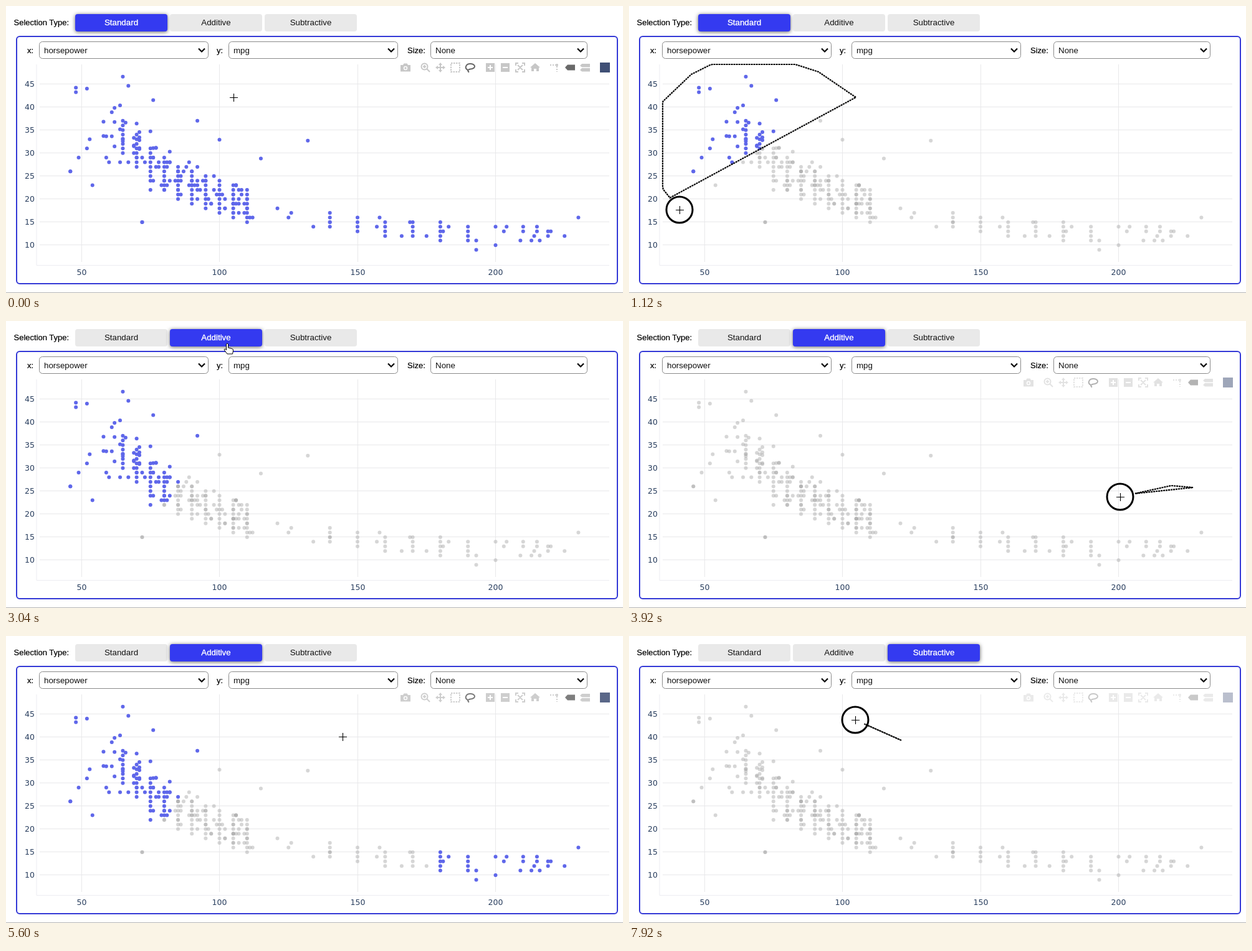
An HTML page that plays this animation: 990x462 px, repeating every 8 s.

```html
<!DOCTYPE html>
<html lang="en">
<head>
<meta charset="utf-8">
<title>Lasso selection</title>
<style>
  html, body { margin: 0; width: 100%; height: 100%; overflow: hidden; background: #fff; }
  svg { display: block; width: 990px; height: 462px; }
  text { font: 13.33px "Liberation Sans", Arial, sans-serif; fill: #111; }
  .label { font-size: 13px; fill: #000; stroke: #000; stroke-width: .2px; }
  .tick { font: 12.5px "DejaVu Sans", Verdana, sans-serif; fill: #2a3f5f; }
  .mid { text-anchor: middle; }
  .end { text-anchor: end; }
  .tab rect { fill: #e9e9e9; }
  .tab.on rect { fill: #343af0; filter: drop-shadow(0 1px 3px #0009); }
  .tab.on text { fill: #fff; stroke: #fff; stroke-width: .35px; }
  .dot { fill: #a6a6a6; fill-opacity: .46; }
  .dot.on { fill: #5f67ea; fill-opacity: 1; }
  #bar { fill: #c7c7c7; }
  #bar .line { fill: none; stroke: #c7c7c7; stroke-width: 2; }
</style>
</head>
<body>
<svg viewBox="0 0 990 462">
  <text class="label" x="12.5" y="31">Selection Type:</text>
  <g id="tabs"></g>
  <rect x="17" y="49" width="964" height="398" rx="5" fill="#fff" stroke="#3338d6" stroke-width="2"/>
  <path d="M0 461.5H990" stroke="#b4b4b4"/>
  <g id="selects"></g>
  <path d="M49 94V417.5H968" fill="none" stroke="#ececf1"/>
  <g id="grid" stroke="#e8e8ea"></g>
  <g id="ticks"></g>
  <g id="dots"></g>
  <g id="bar">
    <path d="M633 95h4l1.5-2.5h5l1.5 2.5h4v10.5h-16z"/>
    <circle cx="641" cy="100" r="3.2" fill="#fff"/><circle cx="641" cy="100" r="1.8"/>
    <circle class="line" cx="671.5" cy="97.5" r="5"/>
    <path class="line" d="M675 101l5 5M669 97.5h5M671.5 95v5M691 99h12M697 93v12"/>
    <path d="M697 91l3 4h-6zM697 107l3-4h-6zM689 99l4-3v6zM705 99l-4-3v6z"/>
    <rect class="line" x="714" y="92" width="14" height="14" stroke-dasharray="2.5 1.5"/>
    <path class="line" d="M741 103c-6-3-3-10 4-10s10 6 3 8c-4 1-7 1-7 3s2 0 1 3" style="stroke:#666"/>
    <path d="M770 92h14v14h-14zM794 92h14v14h-14z"/>
    <path class="line" d="M773 99h8M777 95v8M797 99h8" style="stroke:#fff"/>
    <path class="line" d="M818 96v-4h4M828 92h4v4M832 102v4h-4M822 106h-4v-4M821 95l8 8M829 95l-8 8"/>
    <path d="M849 92l8 7h-2v6h-4v-4h-4v4h-4v-6h-2z"/>
    <path class="line" d="M873 95h9M884 97v9" stroke-dasharray="2 2"/><circle cx="884" cy="95" r="2"/>
    <path d="M897 99l4-4.5h12v9h-12z" fill="#696969"/>
    <path d="M921 96l3-3h13v5.5h-13zM921 103l3-3h13v5.5h-13z"/>
    <rect x="953" y="91" width="16" height="16" fill="#3f4f75"/>
  </g>
  <path id="lasso" fill="none" stroke="#000" stroke-width="2.2" stroke-dasharray="3 1"/>
  <g id="pointer">
    <circle id="ring" r="21" fill="none" stroke="#000" stroke-width="3"/>
    <path id="cross" d="M-6 .5H7M.5-6V7" stroke="#000" stroke-width="1.1"/>
    <path id="hand" d="M-1.5 0q1.5-2 3 0v6l6 1.5q2.5.5 2 3.5l-1 5H0l-4.5-6q-1-2 1-2l2 1.5z" fill="#fff" stroke="#000"/>
    <path id="arrow" d="M0 0v13l3-3 2 5 2-1-2-5h4z" fill="#000" stroke="#fff"/>
  </g>
</svg>
<script>
const $ = id => document.getElementById(id);
const add = (parent, tag, attrs, text = "") => {
  const el = document.createElementNS("http://www.w3.org/2000/svg", tag);
  for (const k in attrs) el.setAttribute(k, attrs[k]);
  el.textContent = text;
  return parent.appendChild(el);
};
const px = hp => 121 + (hp - 50) * 4.43;
const py = mpg => 125.5 + (45 - mpg) * 7.414;
const clamp = (v, low, high) => Math.min(high, Math.max(low, v));

// Controls and axes
const tabs = ["Standard", "Additive", "Subtractive"].map((name, i) => {
  const g = add($("tabs"), "g", { class: "tab" }), x = 111 + i * 152;
  add(g, "rect", { x, y: 13, width: 148, height: 28, rx: 4 });
  add(g, "text", { x: x + 74, y: 31, class: "mid" }, name);
  return g;
});
function select(label, labelX, x, width, value) {
  const g = $("selects");
  add(g, "text", { x: labelX, y: 76, class: "label" }, label);
  add(g, "rect", { x: x + .5, y: 57.5, width: width - 1, height: 27, rx: 5, fill: "#fff", stroke: "#8a8a8a" });
  add(g, "text", { x: x + 8, y: 76 }, value);
  add(g, "path", { d: `M${x + width - 16} 68.5l5 5 5-5`, fill: "none", stroke: "#000", "stroke-width": 2.2 });
}
select("x:", 34, 53, 272, "horsepower");
select("y:", 338, 357, 272, "mpg");
select("Size:", 644, 681, 252, "None");
for (let hp = 50; hp <= 200; hp += 50) {
  const x = Math.floor(px(hp)) + .5;
  add($("grid"), "path", { d: `M${x} 94V412` });
  add($("ticks"), "text", { x, y: 433, class: "tick mid" }, hp);
}
for (let mpg = 10; mpg <= 45; mpg += 5) {
  const y = Math.floor(py(mpg)) + .5;
  add($("grid"), "path", { d: `M54 ${y}H968` });
  add($("ticks"), "text", { x: 46, y: y + 4.5, class: "tick end" }, mpg);
}

// Cars: mpg falls with the square of the power; round powers form columns
const dots = [];
const car = (hp, mpg) => {
  const x = px(hp), y = py(mpg);
  dots.push({ x, y, el: add($("dots"), "circle", { cx: x, cy: y, r: 3, class: "dot" }) });
};
const trend = hp => Math.min(35, 10.6 + 99000 / hp ** 2);
let seed = 7;
const random = () => (seed = seed * 16807 % 2147483647) / 2147483647;

function columns(from, to, step, below, above) {
  for (let hp = from; hp <= to; hp += step) {
    const mid = Math.round(trend(hp));
    for (let mpg = mid - below; mpg <= mid + above; mpg++) car(hp, mpg);
  }
}
function scatter(count, from, to) {
  while (count--) {
    const hp = Math.round(from + random() * (to - from));
    const mpg = trend(hp) + (random() + random() - 1) * 500 / hp;
    car(hp, mpg < 30 ? Math.round(mpg) : mpg);
  }
}
columns(65, 110, 5, 4, 3);
columns(140, 190, 10, 2, 1);
scatter(105, 58, 112);
scatter(26, 112, 225);
[[46, 26], [46, 26], [48, 43.2], [48, 44.2], [49, 29], [52, 44], [52, 31], [53, 33], [54, 23],
 [65, 46.6], [67, 44.6], [76, 41.5], [72, 15], [72, 15], [92, 37], [100, 32.9], [115, 28.8],
 [132, 32.7], [193, 9], [200, 10], [209, 11], [215, 14], [225, 12], [230, 16]]
  .forEach(p => car(...p));

// Pointer path: time, x, y
const moves = [
  [0, 365, 147], [60, 364, 147], [320, 304, 106], [460, 230, 82], [600, 160, 80], [760, 100, 110],
  [960, 30, 177], [1040, 46, 284], [1120, 81, 328], [1650, 140, 345], [1820, 262, 289],
  [1920, 318, 190], [2010, 318, 190], [2160, 289, 134], [2400, 289, 134], [2720, 337, 30],
  [3020, 337, 30], [3660, 905, 268], [3740, 905, 268], [3800, 870, 265], [3920, 788, 283],
  [4240, 690, 325], [4480, 690, 441], [4640, 870, 435], [4800, 968, 350], [4960, 955, 285],
  [5200, 955, 285], [5600, 540, 162], [6720, 460, 34], [7080, 460, 34], [7560, 437, 168],
  [7740, 437, 168], [7920, 363, 135], [8000, 335, 126]];
const drags = [[60, 2010], [3740, 5000], [7740, 8000]];
const clicks = [[2840, 3000], [6950, 7030]];
const barShown = [[-300, 80], [1960, 2480], [3250, 3780], [5360, 6350], [7300, 7740]];

const spanAt = (spans, t) => spans.find(([from, to]) => t >= from && t < to);
const fade = (t, from) => clamp((t - from) / 280, 0, 1);

function pointerAt(t) {
  const i = Math.max(1, moves.findIndex(m => m[0] >= t));
  const [t0, x0, y0] = moves[i - 1], [t1, x1, y1] = moves[i];
  const f = (t - t0) / (t1 - t0);
  return [x0 + (x1 - x0) * f, y0 + (y1 - y0) * f];
}
function outline(from, to) {
  const pts = [];
  for (let t = from; ; t += 10) {
    const [x, y] = pointerAt(Math.min(t, to));
    pts.push([clamp(x, 54, 968), clamp(y, 94, 412)]);
    if (t >= to) return pts;
  }
}
function inside({ x, y }, poly) {
  let hit = false;
  poly.forEach(([ax, ay], i) => {
    const [bx, by] = poly[(i || poly.length) - 1];
    if (ay > y !== by > y && x < ax + (bx - ax) * (y - ay) / (by - ay)) hit = !hit;
  });
  return hit;
}
const [first, second] = drags.map(d => outline(...d));
for (const d of dots) {
  d.first = inside(d, first);
  d.both = d.first || inside(d, second);
}

const show = (id, on) => $(id).style.display = on ? "" : "none";

function draw(t) {
  const drag = spanAt(drags, t), [x, y] = pointerAt(t);
  // The lasso trails slightly behind the pointer
  const poly = drag && outline(drag[0], Math.max(drag[0], t - 35));
  for (const d of dots) {
    const on = poly ? inside(d, poly) : t < 60 || (t < 5000 ? d.first : d.both);
    d.el.classList.toggle("on", on);
  }
  $("lasso").setAttribute("d", poly ? "M" + poly.join("L") + "Z" : "");
  const active = t < 2880 ? 0 : t < 6960 ? 1 : 2;
  tabs.forEach((tab, i) => tab.classList.toggle("on", i === active));
  $("bar").style.opacity = Math.max(...barShown.map(([from, to]) => fade(t, from) - fade(t, to)));
  $("pointer").setAttribute("transform", `translate(${Math.round(x)} ${Math.round(y)})`);
  const cross = drag || y > 92, hand = !cross && y < 41 && x > 111 && x < 563;
  show("ring", drag || spanAt(clicks, t));
  show("cross", cross);
  show("hand", hand);
  show("arrow", !cross && !hand);
}

let start;
function tick(now) {
  start ??= now;
  draw(Math.floor((now - start) % 8000 / 80) * 80);
  requestAnimationFrame(tick);
}
draw(0);
requestAnimationFrame(tick);
</script>
</body>
</html>
```
